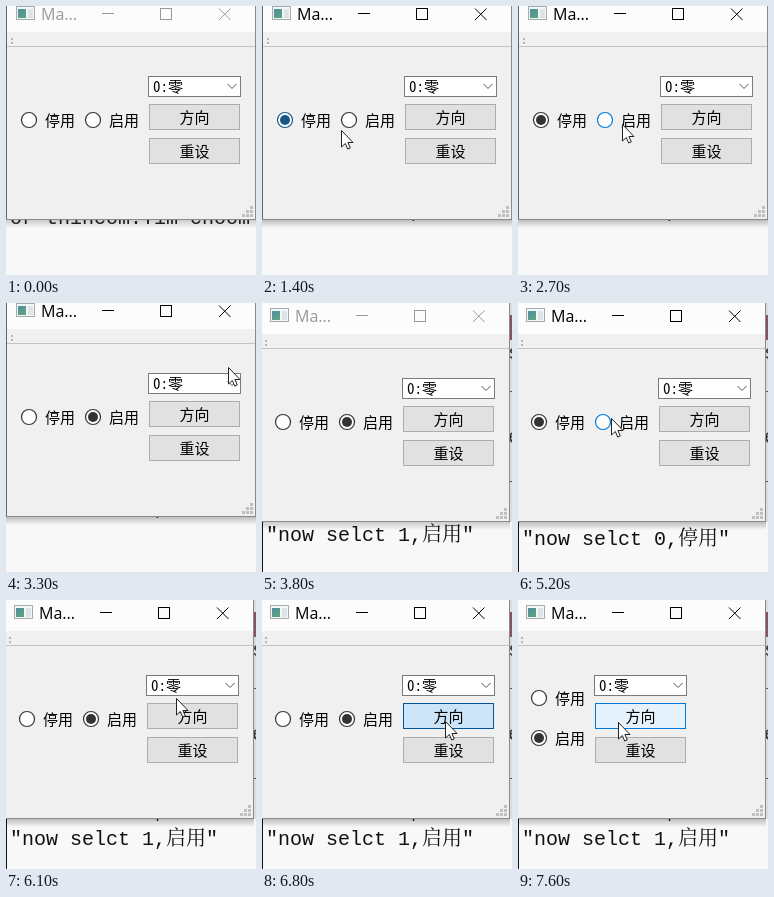
Recreate the animation shown at these times as an HTML page with a canvas. Size 250x269 px, loop 8 s.

```html
<!DOCTYPE html>
<html lang="zh">
<head>
<meta charset="utf-8">
<style>
html, body { margin: 0; width: 250px; height: 269px; overflow: hidden; background: #f8f8f8; }
canvas { display: block; }
</style>
</head>
<body>
<canvas id="stage" width="250" height="269"></canvas>
<script>
const g = document.getElementById('stage').getContext('2d');
const LOOP = 8000, STEP = 100;
const CJK = '"Noto Sans CJK SC", "Noto Sans CJK"';
const UI = `15px "Noto Sans Mono CJK SC", ${CJK}, monospace`;
const LOG = `20px "Liberation Mono", "Noto Serif CJK SC", ${CJK}, monospace`;
const TITLE = '16px "Open Sans", sans-serif';
const DARK = [51, 51, 51], BLUE = [0, 120, 215];

// pointer path: time, x, y
const path = [
  [100, 205, 86], [500, 50, 112], [1200, 50, 112], [1400, 79, 124],
  [1600, 79, 124], [1800, 111, 123], [1900, 111, 122], [2300, 111, 122],
  [2500, 104, 118], [2900, 104, 118], [3400, 251, 51], [4000, 238, 190],
  [4300, 50, 112], [4800, 50, 112], [5200, 93, 115], [5900, 93, 115],
  [6200, 208, 90], [6400, 183, 121], [6900, 183, 121], [7500, 101, 122],
  [7600, 100, 122], [8000, 100, 122]
];

const clamp = v => Math.max(0, Math.min(1, v));
const within = (t, a, b) => t >= a && t < b;
const mix = (a, b, k) => `rgb(${a.map((v, i) => Math.round(v + (b[i] - v) * k))})`;

// 0..1 highlight that fades in at `on` and out at `off`
const glow = (t, on, off) =>
  Math.min(clamp((t - on + 100) / 200), 1 - clamp((t - off + 100) / 200));

function rect(x, y, w, h, fill, border) {
  g.fillStyle = fill;
  g.fillRect(x, y, w, h);
  if (border) {
    g.strokeStyle = border;
    g.lineWidth = 1;
    g.strokeRect(x + .5, y + .5, w - 1, h - 1);
  }
}

function text(s, x, y, font, color = '#000', align = 'left') {
  g.font = font;
  g.fillStyle = color;
  g.textAlign = align;
  g.fillText(s, x, y);
}

function line(color, ...points) {
  g.strokeStyle = color;
  g.lineWidth = 1;
  g.beginPath();
  for (let i = 0; i < points.length; i += 2) g.lineTo(points[i], points[i + 1]);
  g.stroke();
}

function disc(x, y, r, fill, border) {
  g.beginPath();
  g.arc(x, y, r, 0, 7);
  g.fillStyle = fill;
  g.fill();
  if (border) {
    g.strokeStyle = border;
    g.lineWidth = 1.2;
    g.stroke();
  }
}

function radio(label, x, y, on, hot, down) {
  const color = down ? '#005499' : mix(DARK, BLUE, hot);
  disc(x, y, 7.5, down ? '#cce4f7' : '#fff', color);
  if (on) disc(x, y, 5, color);
  text(label, x + 16, y + 6, UI);
}

function button(label, x, y, hot = 0, down = false) {
  const fill = down ? '#cce4f7' : mix([225, 225, 225], [229, 241, 251], hot);
  const border = down ? '#005499' : mix([173, 173, 173], BLUE, hot);
  rect(x, y, 91, 26, fill, border);
  text(label, x + 45.5, y + 19, UI, '#000', 'center');
}

function combo(x, y, hot) {
  rect(x, y, 93, 21, '#fff', mix([122, 122, 122], BLUE, hot));
  text('0:零', x + 5, y + 16, UI);
  line('#555', x + 79.5, y + 8, x + 84, y + 12.5, x + 88.5, y + 8);
}

function logLine(value, y) {
  text(`"now selct ${value},${value ? '启用' : '停用'}"`, 4, y, LOG, '#111');
}

function backdrop(t, moved) {
  rect(0, 0, 250, 269, '#f8f8f8');
  if (moved) {
    const [value, y] = t < 4500 ? [1, 238] : t < 5900 ? [0, 242] : [1, 245];
    logLine(1 - value, y - 28);
    logLine(value, y);
    rect(0, 214, 1, 55, '#111');
    rect(247, 0, 3, 219, '#dcdcdc');
    rect(247, 12, 3, 25, '#85575b');
    text('s', 246, 56, LOG, '#333');
    text('e', 246, 140, LOG, '#333');
    rect(247, 88, 3, 1, '#555');
    rect(247, 178, 3, 1, '#555');
  } else {
    if (t < 1000) text('or thincom.Tim choom', 4, 218, LOG, '#222');
    else logLine(t < 2900 ? 0 : 1, 211);
  }
}

function frame(active) {
  const shade = g.createLinearGradient(0, 213, 0, 222);
  shade.addColorStop(0, active ? '#0004' : '#0003');
  shade.addColorStop(1, '#0000');
  rect(0, 213, 250, 9, shade);
  rect(-8, -8, 258, 222, '#f0f0f0', '#8a8a8a');
  rect(-7, -7, 256, 33, '#fcfcfc');
  rect(0, -8, 1, 221, '#666');
  rect(1, 40, 248, 1, '#c4c4c4');
  for (const y of [32, 36]) rect(5, y, 2, 2, '#b5b5b5');
  for (let i = 0; i < 3; i++)
    for (let j = 0; j <= i; j++) rect(244 - 4 * j, 200 + 4 * i, 3, 3, '#bfbfbf');

  const teal = g.createLinearGradient(13, 3, 20, 12);
  teal.addColorStop(0, '#4f8fa0');
  teal.addColorStop(1, '#5fa57c');
  rect(10, 0, 19, 14, '#f4f7f8', '#a3abaf');
  rect(12, 3, 8, 9, teal);
  rect(22, 3, 5, 9, '#dde4e8');
  const ink = active ? '#000' : '#999';
  text('Ma...', 35, 14, TITLE, ink);
  line(ink, 96, 7.5, 108, 7.5);
  g.strokeRect(154.5, 2.5, 11, 11);
  line(ink, 213, 2.5, 224.5, 14);
  line(ink, 224.5, 2.5, 213, 14);
}

function controls(t) {
  const sel = t < 1000 ? -1 : t < 2900 ? 0 : t < 4500 ? 1 : t < 5900 ? 0 : 1;
  const stopHot = glow(t, 500, 1400) + glow(t, 4300, 4900);
  const startHot = glow(t, 1800, 3100) + glow(t, 5100, 6000);
  const stopDown = within(t, 900, 1000) || within(t, 4400, 4500);
  const startDown = within(t, 2800, 2900) || within(t, 5800, 5900);
  const stacked = t >= 6900, dx = stacked ? -64 : 0;

  radio('停用', 23, stacked ? 93 : 114, sel === 0, stopHot, stopDown);
  radio('启用', stacked ? 23 : 87, stacked ? 133 : 114, sel === 1, startHot, startDown);
  combo(142 + dx, 70, glow(t, 100, 300) + glow(t, 6200, 6300));
  button('方向', 143 + dx, 98, glow(t, 6400, 6900) + glow(t, 7200, 9000), within(t, 6700, 6900));
  button('重设', 143 + dx, 132);
}

function pointer(t) {
  if (t < 100 || within(t, 3400, 4000)) return;
  const i = path.findIndex(p => p[0] > t);
  const [a, x0, y0] = path[i - 1], [b, x1, y1] = path[i];
  const k = (t - a) / (b - a);
  const arrow = new Path2D('M0 0V16.5L3.8 13 6.2 18.5 8.8 17.4 6.4 12H11.5Z');
  g.save();
  g.translate(Math.round(x0 + (x1 - x0) * k) + .5, Math.round(y0 + (y1 - y0) * k) + .5);
  g.fillStyle = '#fff';
  g.strokeStyle = '#222';
  g.lineWidth = 1;
  g.fill(arrow);
  g.stroke(arrow);
  g.restore();
}

function draw(now) {
  const t = Math.floor(now % LOOP / STEP) * STEP;
  const moved = t >= 3800;
  backdrop(t, moved);
  g.save();
  if (moved) g.translate(-2, 5);
  frame(within(t, 900, 3600) || t >= 4400);
  controls(t);
  g.restore();
  pointer(t);
}

const start = performance.now();
function tick() {
  draw(performance.now() - start);
  requestAnimationFrame(tick);
}
tick();
</script>
</body>
</html>
```
